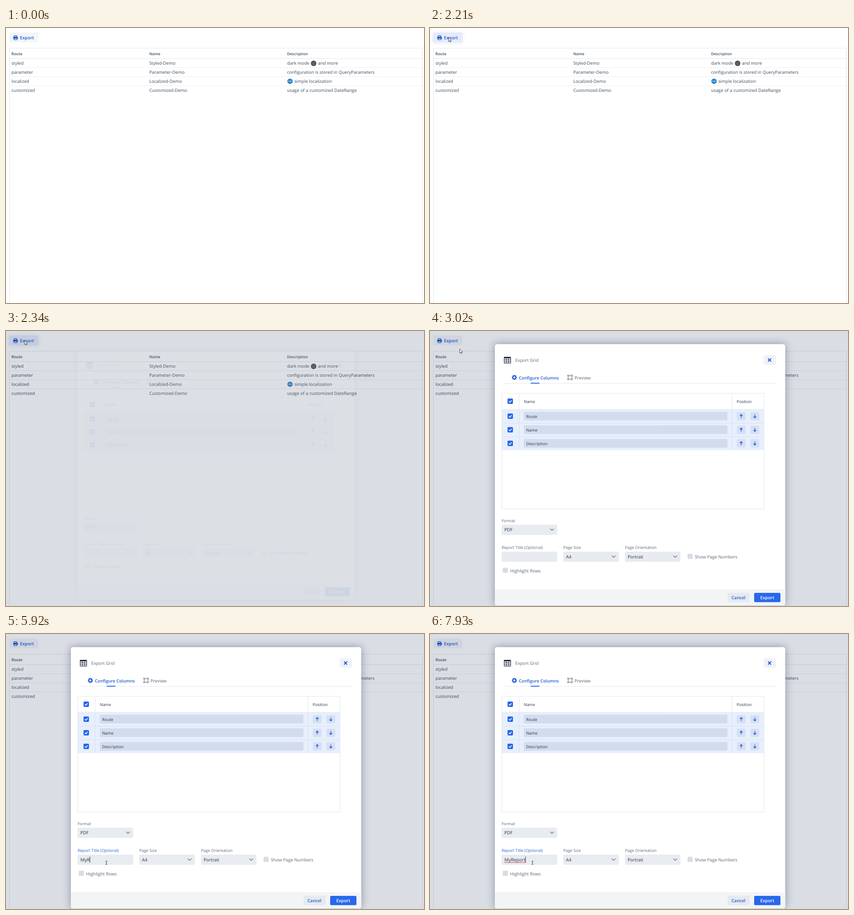
Write an HTML page that moves like this. It is 922 px wide and 607 px high and loops after 7.99 s.

```html
<!DOCTYPE html>
<html lang="en">
<head>
<meta charset="utf-8">
<title>Export dialog</title>
<style>
html, body { margin: 0; width: 100%; height: 100%; overflow: hidden; background: #fff; }
svg { display: block; width: 100vw; height: 100vh; }
text { font-family: "Open Sans", "Noto Sans", sans-serif; text-rendering: geometricPrecision; white-space: pre; }
</style>
</head>
<body>
<svg id="stage" viewBox="0 0 922 607" xmlns="http://www.w3.org/2000/svg"></svg>
<script>
const LOOP = 7990;
const INK = '#3f4b5b', DARK = '#26344a', GREY = '#5b6675', BLUE = '#1f5bd0', LINE = '#e4e7eb';

const text = (x, y, s, size = 9.68, fill = INK, weight = 400, extra = '') =>
  `<text x="${x}" y="${y}" font-size="${size}" fill="${fill}" font-weight="${weight}" ${extra}>${s}</text>`;
const rect = (x, y, w, h, fill, r = 0, extra = '') =>
  `<rect x="${x}" y="${y}" width="${w}" height="${h}" rx="${r}" fill="${fill}" ${extra}/>`;
const path = (d, stroke, width = 1, fill = 'none', extra = '') =>
  `<path d="${d}" stroke="${stroke}" stroke-width="${width}" fill="${fill}" ${extra}/>`;
const hline = (x1, x2, y, c = LINE) => path(`M${x1} ${y}H${x2}`, c);
const vline = (x, y1, y2, c = LINE) => path(`M${x} ${y1}V${y2}`, c);

function page() {
  const rows = [
    ['styled', 'Styled-Demo', 81.3],
    ['parameter', 'Parameter-Demo', 101.3],
    ['localized', 'Localized-Demo', 121],
    ['customized', 'Customized-Demo', 141]
  ];
  const printer =
    path('M18 19.5V16.6H23L24.2 17.8V19.5', BLUE, 1.1) +
    path('M18 24H16.5V20.6Q16.5 19.7 17.4 19.7H24.7Q25.6 19.7 25.6 20.6V24H24', BLUE, 1.2) +
    rect(16.5, 19.8, 9.1, 2.6, BLUE, 0.8) +
    path('M18.2 22.9H23.9V25.9H18.2Z', BLUE, 1.1, '#fff');
  const moon = `<circle cx="678.5" cy="78" r="6" fill="#393d42"/>` +
    `<circle cx="678.5" cy="78" r="4.2" fill="#696e72"/>` +
    path('M675 76L682 80M676 80L681 75M678 74V82', '#484c50', 0.8);
  const globe = `<circle cx="626.5" cy="117.5" r="5.8" fill="#126db9"/>` +
    `<circle cx="626.5" cy="117.5" r="4.3" fill="#9fd5f5"/>` +
    path('M621.5 115.5H631.5M621.5 119.5H631.5M626.5 113V122', '#126db9', 0.9) +
    `<ellipse cx="626.5" cy="117.5" rx="2.5" ry="4.8" fill="none" stroke="#126db9" stroke-width=".8"/>`;
  return rect(0, 0, 922, 607, '#fff') +
    rect(5, 9, 68, 25, '#3c70e0', 4, 'id="glow" opacity="0" filter="url(#soft)"') +
    rect(7, 10, 64, 21.5, '#f3f5f8', 3, 'id="button"') +
    printer + text(30.8, 25, 'Export', 9.75, BLUE, 600, 'id="buttonText"') +
    path('M7.5 607V44.5H918.5V607', LINE) +
    hline(7, 918, 67.5) + [87.5, 107.5, 127.5].map(y => hline(8, 918, y, '#eceef1')).join('') +
    text(12, 59.5, 'Route', 8.45, INK, 600) + text(316, 59.5, 'Name', 8.45, INK, 600) +
    text(620, 59.5, 'Description', 8.3, INK, 600) +
    rows.map(([a, b, y]) => text(12, y, a) + text(316, y, b)).join('') +
    text(620, 81.3, 'dark mode') + moon + text(688.3, 81.3, 'and more') +
    text(620, 101.3, 'configuration is stored in QueryParameters', 9.6) +
    globe + text(636, 121, 'simple localization') +
    text(620, 141, 'usage of a customized DateRange', 9.78);
}

const tick = (x, y) => rect(x, y, 12, 12, '#2868ec', 2) +
  path(`M${x + 3} ${y + 6.1}L${x + 5.2} ${y + 8.3}L${x + 9.2} ${y + 3.9}`, '#fff', 1.5);

function arrowButton(cx, cy, dir) {
  const tip = cy - 4 * dir;
  return rect(cx - 9.7, cy - 9, 19.4, 18, '#d6e0f4', 2.5) +
    path(`M${cx} ${cy + 4 * dir}V${tip}M${cx - 3.2} ${tip + 3.4 * dir}L${cx} ${tip}L${cx + 3.2} ${tip + 3.4 * dir}`, BLUE, 1.4);
}

function field(x, y, label, value, id = '') {
  const chevron = path(`M${x + 107} ${y + 9}L${x + 111} ${y + 12.7}L${x + 115} ${y + 9}`, '#586476', 1.2);
  return text(x, y - 5.8, label, 8.87, GREY, 400, id) +
    rect(x, y, 122.5, 22.5, '#e8ebef', 2.5) +
    (value ? text(x + 6, y + 14.8, value, 9.75, DARK, 500) + chevron : '');
}

function dialog() {
  const tableIcon = rect(163, 57, 15.5, 14.5, '#2b3442', 1) +
    [0, 1, 2].map(c => [0, 1, 2].map(r =>
      rect(164.2 + c * 4.7, 60.4 + r * 3.6, 3.6, 2.6, '#fff')).join('')).join('');
  const teeth = [0, 45, 90, 135].map(a =>
    rect(184.9, 97, 2.4, 11, BLUE, 0.5, `transform="rotate(${a} 186.1 102.5)"`)).join('');
  const gear = teeth + `<circle cx="186.1" cy="102.5" r="3.2" fill="#fff" stroke="${BLUE}" stroke-width="2"/>`;
  const frameIcon = path('M305 98.5H313V106.5H305Z', GREY, 0.9) +
    [303.4, 311.6].map(x => [97, 105].map(y =>
      rect(x, y, 2.8, 2.8, '#fff', 0, `stroke="${GREY}" stroke-width=".8"`)).join('')).join('');
  const rows = ['Route', 'Name', 'Description'].map((s, i) => {
    const y = 188 + i * 30;
    return tick(171, y - 6) + rect(207, y - 9.7, 449, 19.2, '#d3dced', 2) +
      text(212.2, y + 3.7, s, 8.85, DARK) + arrowButton(686.5, y, 1) + arrowButton(716.5, y, -1);
  }).join('');
  return rect(143, 29, 640.5, 577, '#14284a', 5, 'opacity=".42" filter="url(#shadow)"') +
    rect(143, 29, 640.5, 577, '#fff', 5) +
    path('M143 570H783.5V601Q783.5 606 778.5 606H148Q143 606 143 601Z', 'none', 0, '#f3f4f6') +
    tableIcon + text(188.3, 67.6, 'Export Grid', 9.6, GREY) +
    rect(736, 53, 27, 22, '#f0f3f7', 3) + path('M745.5 60.5L752.5 67.5M752.5 60.5L745.5 67.5', BLUE, 2) +
    hline(163, 763, 115.5) + gear + text(196, 106.6, 'Configure Columns', 9.6, BLUE, 600) +
    rect(222, 114.3, 19.5, 1.9, '#2868ec', 0.8) +
    frameIcon + text(318.7, 106.6, 'Preview', 9.84, GREY, 500) +
    rect(158.5, 173, 578.5, 90, '#e7effd') +
    rect(158.5, 137.5, 578.5, 255, 'none', 0, `stroke="${LINE}"`) +
    hline(158, 737, 173, '#e0e5ed') + [203.5, 233.5].map(y => hline(159, 737, y, '#d8e1f0')).join('') +
    [196.5, 666.5].map(x => vline(x, 138, 173) + vline(x, 173, 263, '#d8e1f0')).join('') +
    tick(171, 149) + text(207, 158.5, 'Name', 8.8, DARK) + text(676.6, 158.5, 'Position', 8.8, DARK) +
    rows +
    field(158, 427.5, 'Format', 'PDF') +
    field(158, 487, 'Report Title (Optional)', '', 'id="label"') +
    rect(158, 487, 122.5, 22.5, 'rgba(27,43,65,.06)', 2.5, 'id="hover"') +
    field(294, 487, 'Page Size', 'A4') + field(430, 487, 'Page Orientation', 'Portrait') +
    rect(568, 491.8, 11.5, 11.5, '#d9dde3', 2) + text(584.3, 501.8, 'Show Page Numbers', 9.7, GREY) +
    rect(160.5, 522.5, 11.5, 11.5, '#d9dde3', 2) + text(176.8, 532.6, 'Highlight Rows', 9.8, GREY) +
    path('M164 504.4H211', '#d9433f', 1, 'none', 'id="spell"') +
    text(164.3, 501.9, '', 10.15, DARK, 400, 'id="typed"') +
    rect(164, 491, 1, 14, DARK, 0, 'id="caret"') +
    rect(656.5, 578, 48.5, 20.5, '#e6eaef', 2.5) + text(665, 591.8, 'Cancel', 9.6, BLUE, 600) +
    rect(715, 578, 58, 20.5, '#2868ec', 2.5) + text(728.5, 591.8, 'Export', 9.75, '#fff', 600);
}

const stage = document.getElementById('stage');
stage.innerHTML =
  `<defs><filter id="soft" x="-20%" y="-40%" width="140%" height="180%"><feGaussianBlur stdDeviation="3"/></filter>
  <filter id="shadow" x="-10%" y="-10%" width="120%" height="120%"><feGaussianBlur stdDeviation="9"/></filter></defs>` +
  page() + rect(0, 0, 922, 607, 'rgb(28,48,80)', 0, 'id="backdrop"') +
  `<g id="dialog">${dialog()}</g>
  <circle id="click" r="7.4" fill="#ebeb25" opacity=".85"/>
  <g id="cursor">
    ${path('M0 0V9L2.1 7.1L3.5 10.2L5 9.5L3.6 6.6H6.3Z', '#222', 0.8, '#fff', 'id="arrow"')}
    ${path('M-1.8 -3.8H-.5L0 -3.3L.5 -3.8H1.8M0 -3.3V3.3M-1.8 3.8H-.5L0 3.3L.5 3.8H1.8', '#222', 0.9, 'none', 'id="beam"')}
  </g>`;

const el = {};
stage.querySelectorAll('[id]').forEach(n => el[n.id] = n);

const clamp = v => Math.max(0, Math.min(1, v));
const ramp = (t, a, b) => clamp((t - a) / (b - a));
const smooth = p => p * p * (3 - 2 * p);
const out = p => 1 - (1 - p) ** 3;
const show = (n, on) => n.setAttribute('visibility', on ? 'inherit' : 'hidden');
const mix = (a, b, p) => `rgb(${a.map((v, i) => Math.round(v + (b[i] - v) * p))})`;

// start, end, number of jumps, target x, target y, easing
const moves = [
  [90, 500, 6, 436, 393, smooth],
  [570, 570, 1, 443, 405, smooth],
  [710, 1470, 12, 41, 21, smooth],
  [2600, 2950, 6, 59, 34, smooth],
  [3020, 3020, 1, 65.5, 39.5, smooth],
  [3090, 3770, 11, 243, 517, smooth],
  [3840, 4130, 5, 221.5, 505, out],
  [7860, 7930, 2, 226, 505, smooth]
];

function cursorAt(t) {
  let x = 822, y = 556;
  for (const [a, b, n, tx, ty, ease] of moves) {
    if (t < a) break;
    const jumps = n > 1 ? Math.floor((t - a) / (b - a) * (n - 1) + 1e-6) + 1 : 1;
    const p = ease(Math.min(1, jumps / n));
    x += (tx - x) * p;
    y += (ty - y) * p;
  }
  return [x, y];
}

const keys = [5260, 5520, 5920, 6070, 6185, 6300, 6415, 6530];

function draw(t) {
  const [x, y] = cursorAt(t);
  const beam = t >= 3910;
  el.cursor.setAttribute('transform', `translate(${x} ${y})`);
  show(el.cursor, t >= 90);
  show(el.arrow, t >= 90 && !beam);
  show(el.beam, beam);

  const first = t >= 1930 && t < 2070;
  show(el.click, first || (t >= 4330 && t < 4530));
  el.click.setAttribute('cx', first ? 41 : 221.5);
  el.click.setAttribute('cy', first ? 22 : 505);

  const pressed = t >= 2210 && t < 2600;
  el.button.setAttribute('fill', pressed ? '#e5ebf8' : '#f3f5f8');
  el.glow.setAttribute('opacity', pressed ? 0.12 : 0);
  el.buttonText.setAttribute('fill', t >= 1400 ? '#1f5bdc' : BLUE);
  el.backdrop.setAttribute('opacity', 0.16 * ramp(t, 2210, 2330));

  const open = out(ramp(t, 2335, 2600));
  const s = 0.95 + 0.05 * open;
  show(el.dialog, open > 0);
  el.dialog.setAttribute('opacity', open);
  el.dialog.setAttribute('transform', `translate(${463.25 * (1 - s)} ${317.5 * (1 - s)}) scale(${s})`);

  const hover = ramp(t, 3840, 3980);
  const focus = ramp(t, 4330, 4530);
  el.label.setAttribute('fill', t < 4330
    ? mix([91, 102, 117], [31, 44, 63], hover)
    : mix([31, 44, 63], [35, 94, 218], focus));
  const left = 1 - ramp(t, 4315, 4480);
  el.hover.setAttribute('opacity', hover);
  el.hover.setAttribute('transform', `translate(${280.5 * (1 - left)} 0) scale(${left} 1)`);

  const typed = 'MyReport'.slice(0, keys.filter(k => t >= k).length);
  if (el.typed.textContent !== typed) el.typed.textContent = typed;
  el.caret.setAttribute('x', 164 + (typed ? el.typed.getComputedTextLength() : 0));
  show(el.caret, open > 0 && t >= 4330 && !(t >= 4860 && t < 5260) && !(t >= 7140 && t < 7660));
  show(el.spell, t >= 7590);
}

const start = performance.now();
function loop() {
  draw((performance.now() - start) % LOOP);
  requestAnimationFrame(loop);
}
loop();
</script>
</body>
</html>
```
